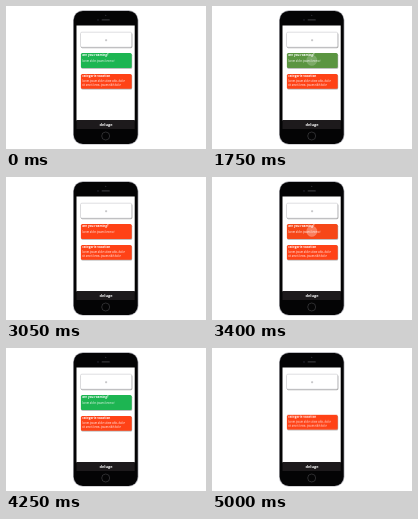
Write an HTML page that moves like this. It is 200x143 px and loops after 5.05 s.

```html
<!DOCTYPE html>
<html lang="en">
<head>
<meta charset="utf-8">
<title>Swipe card demo</title>
<style>
  html, body { margin: 0; width: 100%; height: 100%; overflow: hidden; background: #fff; }
  svg { display: block; width: 100vw; height: 100vh; }
  text { fill: #fff; font-family: "Open Sans", sans-serif; }
  .title { font-size: 3.05px; font-weight: 700; }
  .note { font-size: 2.6px; font-weight: 600; font-style: italic; opacity: .75; }
  .brand { font-size: 3.9px; font-weight: 700; text-anchor: middle; }
  .shadow { fill: #000; opacity: .32; }
  .toggle, .swipe, .lift, .tap { animation: 5050ms linear infinite; }
  .toggle { fill: #1db552; animation-name: toggle; }
  .swipe { animation-name: swipe; }
  .lift { animation-name: lift; }
  .tap { animation-name: tap; opacity: 0; }

  /* colour flips red at 1680 ms, green again at 3380 ms */
  @keyframes toggle {
    0% { fill: #1db552; }
    33.27% { fill: #1db552; animation-timing-function: ease; }
    40.59% { fill: #ff4216; }
    66.93% { fill: #ff4216; animation-timing-function: ease; }
    74.26%, 100% { fill: #1db552; }
  }
  @keyframes swipe {
    0%, 87.13% { transform: translateX(0); }
    90.1% { transform: translateX(18px); }
    95.05%, 100% { transform: translateX(62px); }
  }
  @keyframes lift {
    0%, 95.05% { transform: translateY(0); animation-timing-function: ease-in; }
    99.01%, 100% { transform: translateY(-1.2px); }
  }
  /* two taps in place, then a drag to the right */
  @keyframes tap {
    0%, 26.73% { opacity: 0; transform: translateX(0); }
    28.71%, 33.66% { opacity: 1; }
    36.63%, 60.4% { opacity: 0; }
    62.38%, 67.33% { opacity: 1; }
    70.3%, 84.16% { opacity: 0; }
    86.14% { opacity: 1; }
    87.13% { transform: translateX(0); }
    90.1% { opacity: 1; transform: translateX(10.5px); }
    94.06% { opacity: 0; transform: translateX(24px); }
    100% { opacity: 0; transform: translateX(24px); }
  }
</style>
</head>
<body>
<svg viewBox="0 0 200 143" preserveAspectRatio="none">
  <defs>
    <clipPath id="screen"><rect x="70.5" y="19.5" width="58.2" height="103.5"/></clipPath>
    <filter id="soft" x="-10%" y="-30%" width="120%" height="160%"><feGaussianBlur stdDeviation=".7"/></filter>
  </defs>

  <rect x="67" y="4.3" width="65.4" height="134.2" rx="9.8" fill="#a9a9b0"/>
  <rect x="67.7" y="4.9" width="64" height="133" rx="9.2" fill="#040405"/>
  <circle cx="99.7" cy="9.4" r=".7" fill="#2a2a30"/>
  <circle cx="92" cy="13.9" r=".9" fill="#1e1e28"/>
  <rect x="95.6" y="13.3" width="8.2" height="1.1" rx=".5" fill="#343438"/>
  <circle cx="99.7" cy="130" r="4" fill="#040405" stroke="#48484c" stroke-width=".6"/>

  <rect x="70.5" y="19.5" width="58.2" height="95" fill="#fff"/>
  <rect x="70.5" y="114" width="58.2" height="9" fill="#1d1a1c"/>
  <text class="brand" x="100" y="120">deluge</text>

  <g clip-path="url(#screen)">
    <rect class="shadow" x="74.8" y="27" width="51.6" height="15.2" rx="1.4" filter="url(#soft)"/>
    <rect x="74.5" y="26.2" width="51.2" height="15" rx="1.4" fill="#fff" stroke="#bcbcc0" stroke-width=".5"/>
    <path d="M99 34.2h2.2m-1.1-1.1v2.2" stroke="#98989c" stroke-width=".5"/>

    <g class="lift">
      <rect class="shadow" x="75.2" y="68.6" width="51" height="15" rx="1.5" filter="url(#soft)"/>
      <rect x="74.9" y="67.9" width="50.8" height="14.9" rx="1.5" fill="#ff4216"/>
      <text class="title" x="76.2" y="71">categorie vacation</text>
      <text class="note" x="76.2" y="75.8">lorem ipsum dolor sitam odio, dolor</text>
      <text class="note" x="76.2" y="79.7">sit amet lorem, ipsum nibh dolor</text>
    </g>

    <g class="swipe">
      <rect class="shadow" x="75.2" y="47.7" width="51" height="15" rx="1.5" filter="url(#soft)"/>
      <rect class="toggle" x="74.9" y="47" width="50.8" height="14.9" rx="1.5"/>
      <text class="title" x="76.2" y="50.3">are you roaming?</text>
      <text class="note" x="76.2" y="55.5">lorem dolor ipsum lorem et</text>
    </g>

    <circle class="tap" cx="99.8" cy="54.3" r="5.2" fill="#fff" fill-opacity=".3" stroke="#fff" stroke-opacity=".2" stroke-width=".6"/>
  </g>
</svg>
</body>
</html>
```
